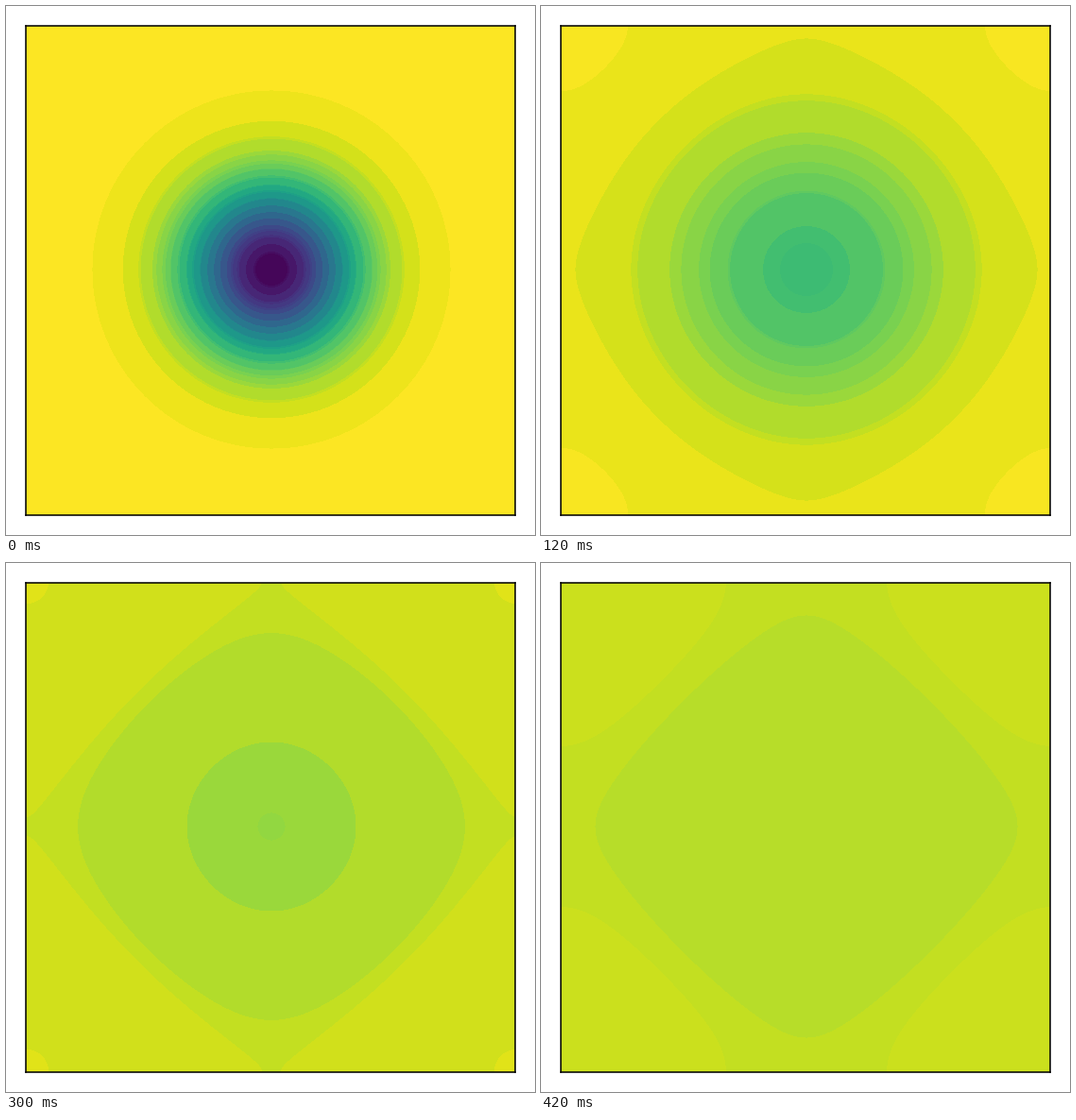
Animation, 560 px wide and 560 px high, one loop 3200 ms. Source, as a matplotlib script:

```python
import matplotlib.pyplot as plt
import numpy as np
from matplotlib.animation import FuncAnimation

STAGE, DPI, PAD = 560, 140, 21
SIDE = STAGE - 2 * PAD          # plot area in pixels
STEP_MS, LAST_STEP = 60, 7      # the field settles after the last step
LOOP_MS, INTERVAL = 3200, 20

SPREAD = 0.0301                 # squared width of the initial Gaussian, domain side = 1
DIFFUSION = 0.00806             # diffusivity times one time step
CENTRE = 0.5 + 1 / SIDE

cmap = plt.get_cmap("viridis")


def field(step):
    """Periodic heat-equation solution: a Gaussian dip that spreads out."""
    width = SPREAD + 4 * DIFFUSION * step
    x = (np.arange(SIDE) + 0.5) / SIDE - CENTRE
    profile = sum(np.exp(-(x - k) ** 2 / width) for k in range(-3, 4))
    return 1 - SPREAD / width * np.outer(profile, profile)


def posterize(rgb):
    """Merge colours sharing a 3-4-3 bit RGB cell into the mean of that cell."""
    flat = rgb.reshape(-1, 3).astype(int)
    cells = (flat[:, 0] >> 5) * 128 + (flat[:, 1] >> 4) * 8 + (flat[:, 2] >> 5)
    _, index, count = np.unique(cells, return_inverse=True, return_counts=True)
    index = index.ravel()
    palette = np.stack([np.bincount(index, flat[:, c]) / count for c in range(3)], axis=1)
    return palette.astype(np.uint8)[index].reshape(rgb.shape)


pictures = [posterize(cmap(field(n), bytes=True)[..., :3]) for n in range(LAST_STEP + 1)]

fig = plt.figure(figsize=(STAGE / DPI, STAGE / DPI), dpi=DPI, facecolor="white")
ax = fig.add_axes([PAD / STAGE, PAD / STAGE, SIDE / STAGE, SIDE / STAGE])
ax.set(xticks=[], yticks=[])
image = ax.imshow(pictures[0], origin="lower", interpolation="nearest", aspect="auto")


def update(frame):
    step = min(frame * INTERVAL // STEP_MS, LAST_STEP)
    image.set_data(pictures[step])
    return [image]


anim = FuncAnimation(fig, update, frames=LOOP_MS // INTERVAL, interval=INTERVAL,
                     repeat=True, repeat_delay=0)
plt.show()
```
